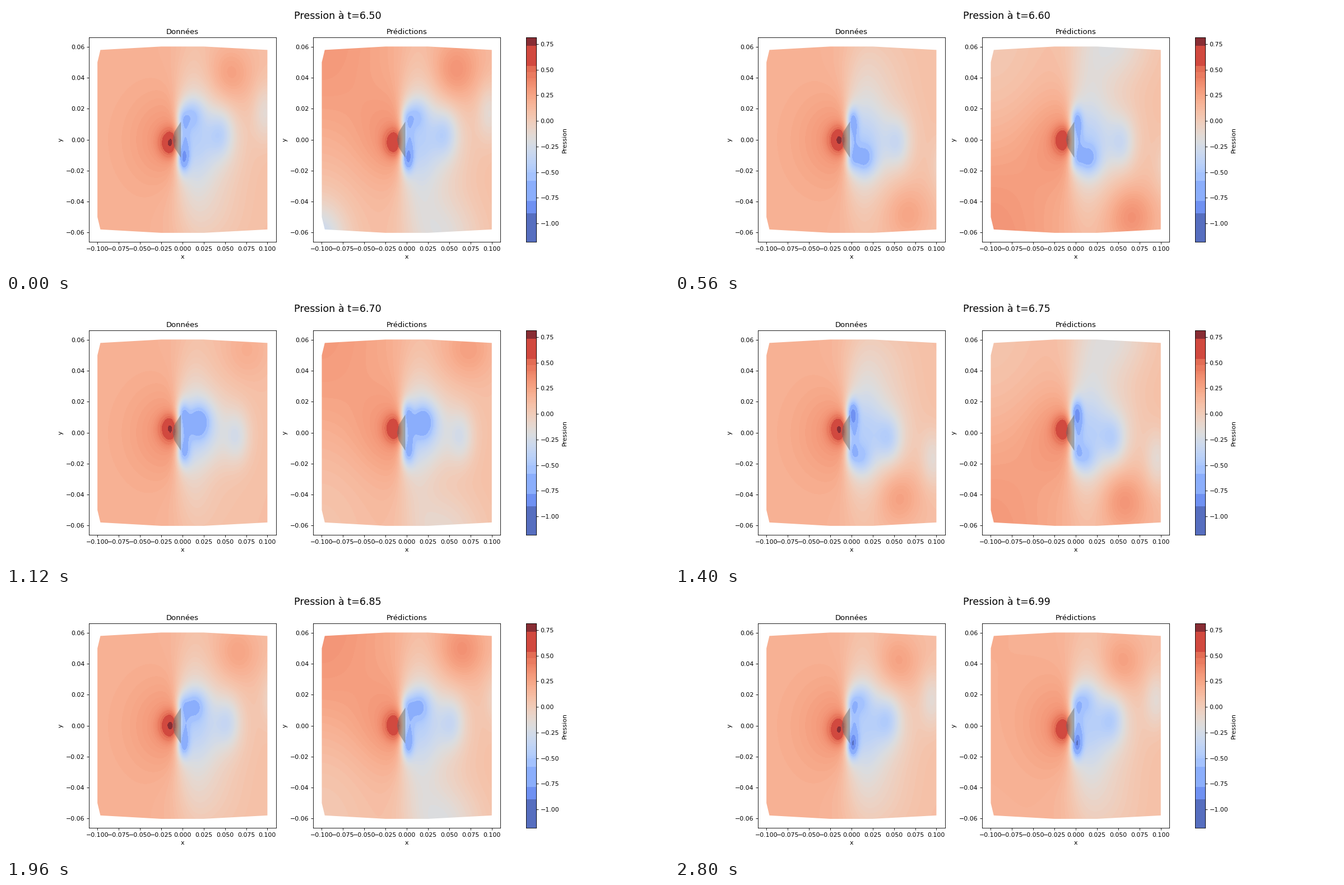
A matplotlib script that plays this animation: 1183x473 px, repeating every 2.94 s.

```python
import numpy as np
import matplotlib.pyplot as plt
from matplotlib.animation import FuncAnimation
from matplotlib.colors import to_rgb
from matplotlib.patches import Polygon

W, H, DPI = 1183, 473, 78.92
FRAMES, STEP_MS = 21, 140
T0, DT, PERIOD = 6.5, 0.0247, 0.166
VMIN, VMAX, SHADES = -1.18, 0.814, 100
XR, YR = 0.1, 0.0605

# The layout is that of a 15 x 6 inch page, a fraction of a pixel over the stage
KX, KY = 15 * DPI / W, 6 * DPI / H

fig = plt.figure(figsize=((W + 0.01) / DPI, (H + 0.01) / DPI), dpi=DPI)

x, y = np.meshgrid(np.linspace(-XR, XR, 304), np.linspace(-YR, YR, 334))


def bump(cx, cy, sx, sy):
    return np.exp(-((x - cx) / sx) ** 2 / 2 - ((y - cy) / sy) ** 2 / 2)


def pulse(a, mid, width):
    return np.exp(-((a - mid) / width) ** 2)


def ramp(a, start, length):
    return np.clip((a - start) / length, 0, 1)


# Steady part: high pressure upstream, low pressure behind the body
far = np.abs(y)
FRONT = 0.5 * (1 - np.tanh((x + 0.006 + 0.1 * far) / (0.004 + 0.15 * far)))
BASE = 0.185 - 0.043 * (1 + np.tanh(x / 0.03))
HALO = 0.17 * bump(-.013, 0, .032, .02)
WAKE = (-0.34 * bump(.023, 0, .030, .019) - 0.2 * bump(.012, 0, .016, .035)
        - 0.2 * bump(.002, 0, .005, .010)
        - 0.2 * bump(-.001, .013, .005, .005)
        - 0.2 * bump(-.001, -.013, .005, .005))
LEFT_ERR = 0.17 * np.tanh(y / .04) * np.exp(-((x + .1) / .075) ** 2)
CORNER = 0.42 * bump(-.105, -.066, .022, .017)


def vortex(age, side):
    """Low-pressure spot: clings to the body, rolls up, then drifts away."""
    cx = 0.022 * np.log1p(np.exp((age - 0.03) / 0.2))
    cy = 0.007 + 0.011 * np.cos(2 * np.pi * max(age + 0.17, 0) / 1.14)
    cy -= 0.006 * ramp(-age, 0.17, 0.3)
    fade = ramp(age, -0.95, 0.2) * ramp(-age, -1.15, 0.2)
    amp = 0.5 * pulse(age, -0.72, 0.13) + fade * (0.22 + 0.18 * pulse(age, 0.15, 0.2))
    sx = 0.005 + 0.005 * ramp(age, -0.45, 0.3)
    sy = 0.007 + 0.006 * ramp(age, 0, 0.8)
    return -amp * bump(cx, side * cy, sx, sy)


def spot(age, side):
    """High-pressure spot that runs beside each vortex."""
    amp = 0.18 * pulse(age, -0.1, 0.28)
    return amp * bump(.065 + .1 * age, side * (.047 + .06 * age), .018, .013)


def pressure(i, guess=False):
    p = (i - 14) * DT / PERIOD
    core = bump(-.013, 0.0042 * np.sin(2 * np.pi * p), .009, .006)
    front = HALO + (0.42 if guess else 0.46) * core
    wake, outer = WAKE, BASE
    swing = np.cos(2 * np.pi * (p + 0.1))
    for side, shift in ((1, 0), (-1, 0.5)):
        first = (p + shift + 0.95) % 1 - 0.95
        wake = wake + sum(vortex(first + k, side) for k in range(3))
        outer = outer + spot((p + shift + 0.5) % 1 - 0.5, side)
        outer = outer - 0.12 * max(0, side * swing) * bump(.03, -side * .043, .028, .02)
    field = outer + FRONT * front + (1 - FRONT) * wake
    if guess:
        # The model's error leans to either side in step with the shedding
        err = np.cos(2 * np.pi * p) * (1 - 0.9 * ramp(i, 17, 3))
        lean = np.sign(err)
        field = field + err * LEFT_ERR - CORNER * (1 - ramp(i, 0, 3))
        field = field + abs(err) * (0.1 * bump(.065, lean * .055, .025, .016)
                                    - 0.24 * bump(.045, -lean * .066, .030, .018))
    return np.clip(field, VMIN, VMAX)


def palette():
    """Coolwarm, with broad flat bands towards both ends."""
    v = VMIN + (np.arange(SHADES) + 0.5) / SHADES * (VMAX - VMIN)
    rgb = plt.get_cmap("coolwarm")(np.linspace(0, 1, SHADES))[:, :3]
    low, high = (-.9, -.78, -.58, -.5), (.42, .47, .54, .74)
    for edges in (low, high):
        for a, b in zip(edges, edges[1:]):
            band = (v >= a) & (v < b)
            rgb[band] = rgb[band].mean(axis=0)
    rgb[v < low[0]] = to_rgb("#566ebf")
    rgb[v >= high[-1]] = to_rgb("#882d34")
    return rgb


RGB = palette()


def paint(field):
    k = ((field - VMIN) / (VMAX - VMIN) * SHADES).astype(int)
    return RGB[np.clip(k, 0, SHADES - 1)]


def mirror(points):
    return points + [(a, -b) for a, b in points[::-1]]


OUTLINE = mirror([(-.1, .05), (-.0965, .058), (-.025, .0602), (.025, .0602), (.1, .058)])
BODY = mirror([(-.0115, 0), (-.0095, .005), (-.0017, .0117)])


def axes_at(left, width):
    return fig.add_axes([left * KX, 0.11 * KY, width * KX, 0.77 * KY])


def panel(left, title):
    ax = axes_at(left, 0.31 / 1.1)
    ax.set_title(title)
    img = ax.imshow(np.ones(x.shape + (3,)), extent=(-XR, XR, -YR, YR),
                    origin="lower", aspect="auto", interpolation="nearest")
    edge = Polygon(OUTLINE, facecolor="none", edgecolor="none")
    ax.add_patch(edge)
    img.set_clip_path(edge)
    ax.add_patch(Polygon(BODY, facecolor="#6a6a6a", edgecolor="none", alpha=0.5))
    ax.set(xlim=(-.11, .11), ylim=(-.066, .066), xlabel="x", ylabel="y",
           xticks=np.arange(-4, 5) * 0.025, yticks=np.arange(-3, 4) * 0.02)
    return img


data = panel(0.125, "Données")
guess = panel(0.125 + 0.372 / 1.1, "Prédictions")

cax = axes_at(0.78375, 0.77 * 6 / 15 / 20)
cax.imshow(RGB[:, None, :], extent=(0, 1, VMIN, VMAX), origin="lower",
           aspect="auto", interpolation="nearest")
cax.yaxis.tick_right()
cax.yaxis.set_label_position("right")
cax.set(xticks=[], yticks=np.arange(-4, 4) * 0.25, ylabel="Pression",
        ylim=(VMIN, VMAX))

heading = fig.suptitle("", x=0.5 * KX, y=0.98 * KY, fontsize=16)


def draw(i):
    data.set_data(paint(pressure(i)))
    guess.set_data(paint(pressure(i, True)))
    heading.set_text(f"Pression à t={T0 + DT * i:.2f}")
    return data, guess, heading


anim = FuncAnimation(fig, draw, frames=FRAMES, interval=STEP_MS,
                     repeat=True, repeat_delay=0, blit=False)
plt.show()
```
